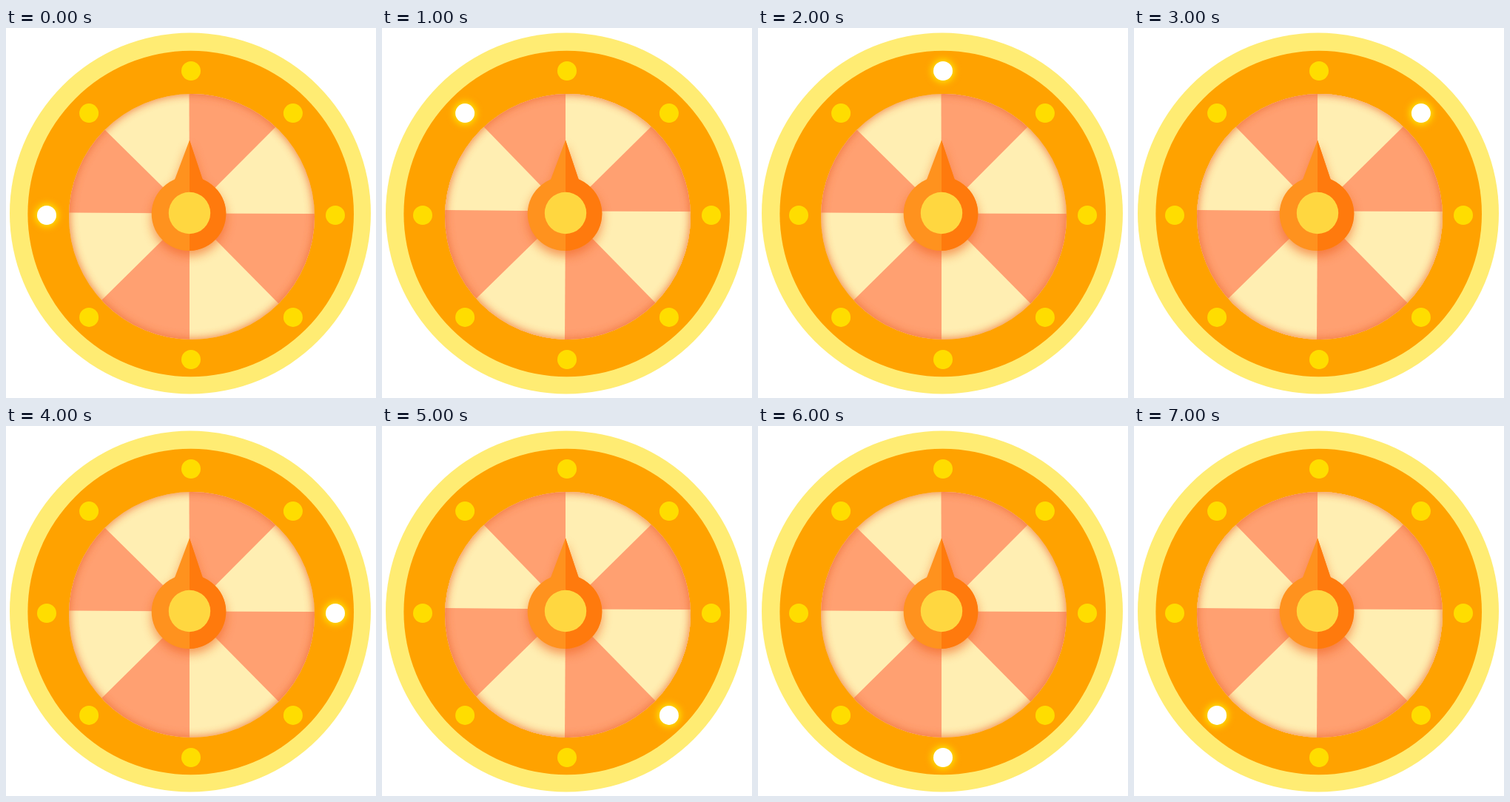
Animation, 500 px wide and 500 px high, one loop 8 s. Source, as an HTML page:

```html
<!DOCTYPE html>
<html lang="en">
<head>
<meta charset="utf-8">
<title>Prize wheel</title>
<style>
  html, body { margin: 0; width: 100%; height: 100%; overflow: hidden; background: #fff; }
  svg { display: block; width: 100vw; height: 100vh; }
</style>
</head>
<body>
<svg viewBox="0 0 500 500">
  <defs>
    <clipPath id="disc"><circle cx="251" cy="255" r="166"/></clipPath>
    <clipPath id="rightHalf"><rect x="248" y="140" width="60" height="170"/></clipPath>
    <path id="pointer" d="M248 151.500 L265.300 203.500 Q266 205 268 205.600 A50.300 50 0 1 1 226 205.600 Q228 205 228.500 203.500 Z"/>
    <filter id="edgeBlur" x="-20%" y="-20%" width="140%" height="140%"><feGaussianBlur stdDeviation="6"/></filter>
    <filter id="hubBlur" x="-40%" y="-40%" width="180%" height="180%"><feGaussianBlur stdDeviation="7"/></filter>
    <filter id="glowBlur" x="-100%" y="-100%" width="300%" height="300%"><feGaussianBlur stdDeviation="4"/></filter>
  </defs>

  <circle cx="249" cy="250.500" r="244" fill="#ffec73"/>
  <circle cx="249.700" cy="251" r="220.300" fill="#ffa200"/>

  <g clip-path="url(#disc)">
    <g id="wheel"></g>
    <circle cx="251" cy="255" r="173" fill="none" stroke="#ee6e35" stroke-width="16" opacity=".85" filter="url(#edgeBlur)"/>
  </g>

  <use href="#pointer" y="7" fill="#f0601e" opacity=".6" filter="url(#hubBlur)"/>
  <use href="#pointer" fill="#ff921e"/>
  <use href="#pointer" fill="#ff7a0d" clip-path="url(#rightHalf)"/>
  <circle cx="248" cy="250" r="28.200" fill="#ffd740"/>

  <g id="bulbs"></g>
</svg>
<script>
const STEP = 1000, BULBS = 8;
const SALMON = '#ffa071', CREAM = '#ffeeb2';

// Rim ends of the spokes, clockwise from the top, for both wheel positions.
const poses = [
  { hub: [248, 250.5], first: SALMON, second: CREAM,
    rim: [[247.5, 89], [362, 136], [417, 251], [369, 373], [248, 421], [129, 368], [85, 249.5], [134, 138]] },
  { hub: [248, 247.5], first: CREAM, second: SALMON,
    rim: [[248, 89], [362, 135], [417, 248], [369, 371], [247, 421], [127, 366], [85, 246], [138, 134]] }
];

function add(parent, tag, attrs = {}) {
  const el = document.createElementNS('http://www.w3.org/2000/svg', tag);
  for (const key in attrs) el.setAttribute(key, attrs[key]);
  return parent.appendChild(el);
}

// Shows an element for one step out of `count`, starting at step `index`.
function blink(el, index, count) {
  const animation = el.animate([
    { opacity: 1, offset: 0, easing: 'step-end' },
    { opacity: 0, offset: 1 / count },
    { opacity: 0, offset: 1 }
  ], { duration: count * STEP, delay: (index - count) * STEP, iterations: Infinity });
  animation.startTime = document.timeline.currentTime;
}

const wheel = document.getElementById('wheel');
poses.forEach(({ hub, rim, first, second }, p) => {
  const group = add(wheel, 'g');
  const outer = rim.map(pt => pt.map((v, k) => hub[k] + (v - hub[k]) * 1.3));
  add(group, 'circle', { cx: 251, cy: 255, r: 168, fill: second });
  for (let i = 0; i < 8; i += 2) {
    add(group, 'polygon', { points: [hub, outer[i], outer[i + 1]].join(' '), fill: first });
  }
  if (p) blink(group, p, 2);
});

const bulbs = document.getElementById('bulbs');
const lamps = Array.from({ length: BULBS }, (_, i) => {
  const angle = Math.PI + i * Math.PI / 4;
  return { cx: 250 + 195 * Math.cos(angle), cy: 253 + 195 * Math.sin(angle) };
});
lamps.forEach(at => add(bulbs, 'circle', { ...at, r: 13, fill: '#ffdd00' }));
lamps.forEach((at, i) => {
  const lit = add(bulbs, 'g');
  add(lit, 'circle', { ...at, r: 16, fill: '#ffdd00', filter: 'url(#glowBlur)' });
  add(lit, 'circle', { ...at, r: 13, fill: '#fff' });
  blink(lit, i, BULBS);
});
</script>
</body>
</html>
```
